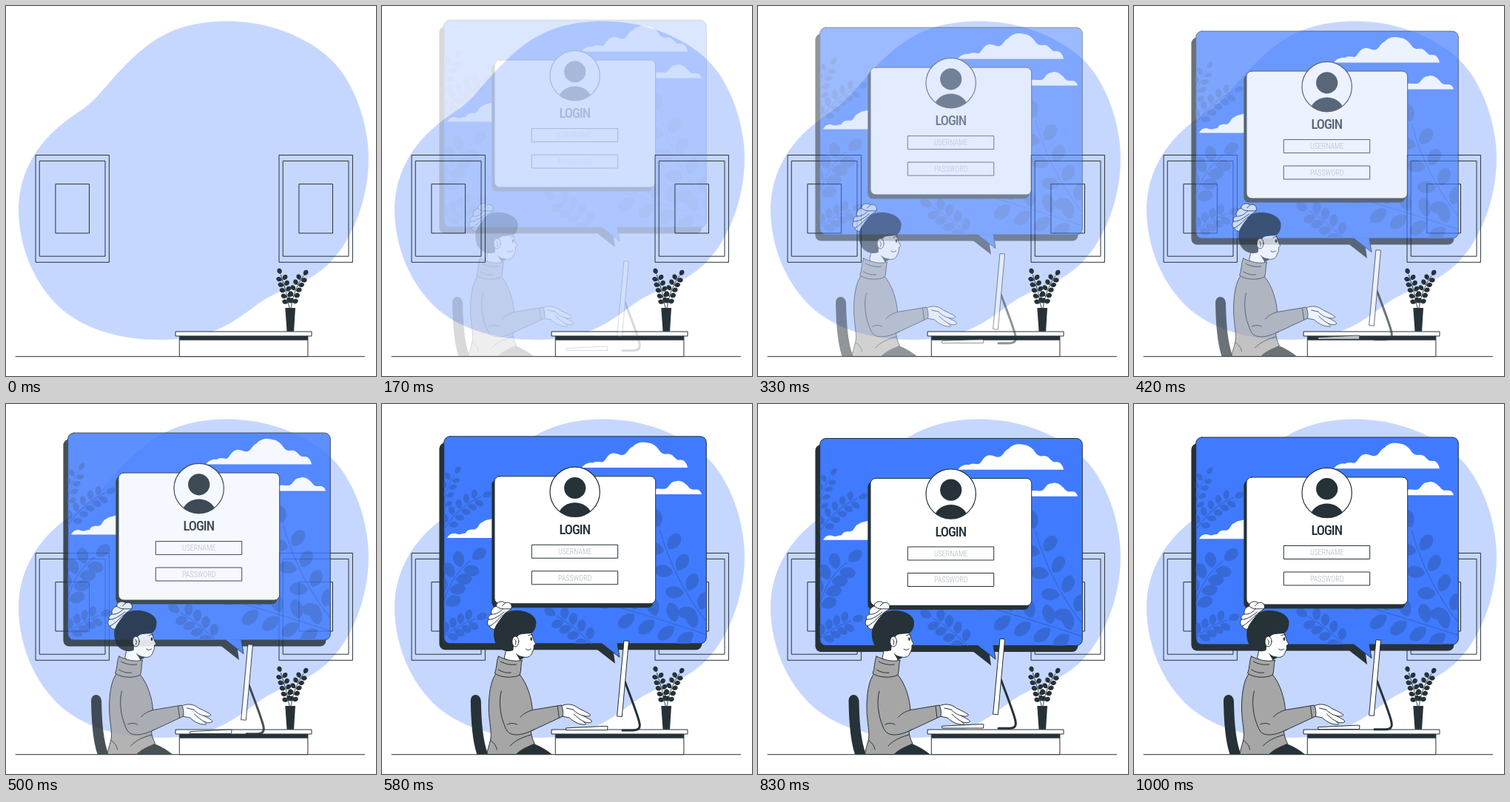
These frames come from a looping animation (500 px wide and 500 px high, 1.04 s). An HTML page:

```html
<!DOCTYPE html>
<html lang="en">
<head>
<meta charset="utf-8">
<title>Login</title>
<style>
html, body { margin: 0; width: 100%; height: 100%; overflow: hidden; background: #fff; }
svg { display: block; width: 100%; height: 100%; }
.line { fill: none; stroke: #263238; stroke-width: 1; stroke-linecap: round; stroke-linejoin: round; }
.white { fill: #fff; }
.dark { fill: #263238; }
text { font-family: 'Oswald', 'Roboto Condensed', 'Open Sans Condensed', 'Open Sans', Roboto, sans-serif; font-stretch: 75%; text-anchor: middle; }
.title { font-size: 18.5px; font-weight: 500; letter-spacing: -1px; }
.hint { font-size: 10px; font-weight: 300; fill: #aeb3b7; }
</style>
</head>
<body>
<svg viewBox="0 0 500 500">
  <defs>
    <clipPath id="pane"><rect x="83.7" y="46.5" width="354.6" height="280" rx="8"/></clipPath>
    <g id="picture" class="line">
      <rect x="40.4" y="201.5" width="99" height="144.8"/>
      <rect x="45.6" y="209.4" width="88.4" height="128.8"/>
      <rect x="67.3" y="240.6" width="45.2" height="66.4"/>
    </g>
  </defs>

  <path fill="#c6d7ff" d="M300 20.5C352 20.5 406 40 441 74C472 106 490 160 490 206C490 262 467 322 430 354C398 380 376 378 340 403C307 427 280 451 206 451C160 451 112 440 76 410.5C38 377 17 325 17 275C17 233 36 195 66 168C96 141 105 143 127 118C151 91 171 66 203 45C233 26.5 266 20.5 300 20.5Z"/>
  <use href="#picture"/>
  <use href="#picture" x="329"/>

  <g id="panel">
    <path class="dark" d="M290 334L315 353.5L312 333Z"/>
    <rect class="dark" x="77.4" y="55" width="355" height="280" rx="8"/>
    <rect class="line" style="fill:#407bff" x="83.7" y="46.5" width="354.6" height="280" rx="8"/>
    <path fill="#407bff" d="M296 325.6L321 345L318 325.6Z"/>
    <path class="line" d="M297 326.5L321 345L318 326.5"/>
    <g clip-path="url(#pane)">
      <g id="foliage" fill="#3769d6" stroke="#3769d6"></g>
    </g>
    <g class="white" transform="translate(0 -.7)">
      <path d="M270 89.5C274 84 280 82 285 83C290 80 294 82 298 82C303 80 304 71 312 70C318 69 322 74 327 72C332 70 332 64 339 61C344 55 352 54 360 56C368 57 372 62 376 68C382 74 386 69 391 72C396 75 397 80 403 79C409 79 412 84 413 89.5Z"/>
      <path d="M368 125.5V119C374 116 380 120 385 117C389 114 390 108 397 108C403 105 409 110 413 114C417 120 420 119 425 119C429 119 431 122 432 125.5Z"/>
      <path d="M88 184.5C91 179 96 177 101 179C105 181 109 178 113 178C116 172 121 173 125 173C130 172 131 164 136 163C141 159 147 160 153 157V184.5Z"/>
    </g>
    <rect class="dark" x="148.3" y="105" width="218" height="173" rx="7"/>
    <rect class="line" style="fill:#fff" x="152" y="100.5" width="217.7" height="172" rx="7"/>
    <circle class="line" style="fill:#fff;stroke-width:1.2" cx="260.7" cy="121.5" r="33.7"/>
    <circle class="dark" cx="260.7" cy="116.2" r="14.6"/>
    <path class="dark" d="M239.8 148C243 141 251 136 260.7 136S278.5 141 281.7 148A33.7 33.7 0 0 1 239.8 148Z"/>
    <text class="title dark" x="260.3" y="178.9">LOGIN</text>
    <rect class="line" x="202.7" y="193" width="116" height="18"/>
    <rect class="line" x="202.7" y="228.5" width="116" height="18"/>
    <text class="hint" x="260.7" y="205.8">USERNAME</text>
    <text class="hint" x="260.7" y="241.4">PASSWORD</text>
  </g>

  <path class="line" d="M13 473.7H484.5"/>
  <rect class="line" style="fill:#fff" x="234.7" y="446" width="173.2" height="27.7"/>
  <rect class="dark" x="234.7" y="446" width="173.2" height="5.7"/>
  <rect class="line" style="fill:#fff" x="229.5" y="440" width="183.5" height="6"/>
  <path class="dark" d="M377.3 408H391L389 439.7H379.5Z"/>
  <g id="plant" fill="#263238" stroke="#263238"></g>

  <g id="monitor">
    <path class="line" style="stroke-width:3" d="M328.5 373C337 396 345 416 347.6 427C350 436 346 438 340 438.2H325"/>
    <path class="line" style="fill:#fff" d="M327.3 317.2L333.5 317.7L324.3 419.8L318 419.3Z"/>
    <path class="line" style="fill:#fff" d="M249 435.2L302 432.6L305 433L304.5 438H249Z"/>
  </g>

  <g id="person">
    <path class="dark" d="M122.5 402C122 390 136 390 136.5 402C137 430 139 455 146 473.5H131C125 455 123 430 122.5 402Z"/>
    <path class="dark" d="M180 473.5C190 464 200 462 208 459C218 463 226 468 232.5 473.5Z"/>
    <path class="line" style="fill:#fff" d="M204 309C206 313 207 317 208 320C210 323 211 325 208 326C208 329 208 332 206 335C204 342 199 343 194 342L189 341V351C181 351 172 348 168 343L172 325L182 312Z"/>
    <path class="dark" d="M183 336C187 340 191 342 196 342.3L189 346Z"/>
    <path class="dark" d="M155 300C160 286 170 280 182 279C198 278 211 286 211 295C211 303 208 308 204 310C196 311 190 310 187 313C183 317 181 322 180 333C172 336 162 333 157 325C153 317 153 308 155 300Z"/>
    <ellipse class="line" style="fill:#fff" cx="183" cy="321" rx="4.5" ry="7"/>
    <path class="line" d="M182 318Q185 320 183 325M197 331Q200 334 204 331M200.5 313Q203 310.5 206 312"/>
    <ellipse class="dark" cx="204.4" cy="317.6" rx="1.3" ry="2.3"/>
    <path class="line" style="fill:#fff" d="M157 273C157 267 166 265 169 269C175 266 180 272 177 277C174 280 170 281 168 284C164 290 158 296 155 304C152 305 149 303 148 300C145 299 144 294 147 291C145 288 148 285 151 284C149 280 152 275 157 273Z"/>
    <path class="line" d="M157 273C163 279 170 276 177 277M151 284C157 285 162 281 166 277M147 291C153 292 160 287 168 281M148 300C153 298 160 291 166 285M169 269L165 273"/>
    <path class="line" style="fill:#fff" d="M245 408C253 404 262 406 268 411C274 414 281 417 284.5 420C283 423 278 422 274 421C279 424 285 426 286.5 429C284 431.5 279 431 275 429C276 431 279 432 278 433C271 434 262 430 256 424L246 422Z"/>
    <path class="line" d="M261 413C266 418 270 420 274 421M262 419C267 424 271 427 275 429M252 411L261 413"/>
    <path class="line" style="fill:#a6a6a6" d="M158 363C149 372 147 395 147 410C147 430 152 445 149 455C147 463 145 468 144.5 473.5H184C191 466 201 463 209 459C206 453 204 447 204 442L247 422C248 416 247 411 245 407L206 413.5C205 398 199 378 189 366Z"/>
    <path class="line" d="M164 388C160 400 163 420 166 428C170 440 172 447 184 447C192 447 200 444 208 440M206 413.5C198 416 193 419 190 423M172 433C176 431 181 431 185 433M150 455C155 459 157 462 158 467M176 462C181 456 190 451 204 447M240 408.5L242 424"/>
    <path class="line" style="fill:#a6a6a6" d="M160 341C157 348 158 357 155 364C163 370 180 371 189 366C191 360 190 352 192 346C182 349 170 346 160 341Z"/>
    <path class="line" d="M163 348C170 352 178 353 184 352M160 359C165 362 171 364 177 363"/>
  </g>
</svg>
<script>
const $ = id => document.getElementById(id);
const NS = 'http://www.w3.org/2000/svg';

function add(parent, attrs) {
  const el = document.createElementNS(NS, 'path');
  for (const k in attrs) el.setAttribute(k, attrs[k]);
  parent.appendChild(el);
}

function leaf(parent, x, y, deg, len, w) {
  add(parent, {
    d: `M0 0C${len * .2} ${-w} ${len * .9} ${-w} ${len} 0C${len * .9} ${w} ${len * .2} ${w} 0 0Z`,
    transform: `translate(${x} ${y}) rotate(${deg})`, stroke: 'none'
  });
}

// Quadratic stem with pairs of leaves and one at the tip
function branch(parent, [x0, y0, cx, cy, x1, y1], pairs, len, w, gap) {
  add(parent, { d: `M${x0} ${y0}Q${cx} ${cy} ${x1} ${y1}`, fill: 'none', 'stroke-width': len > 12 ? 1.4 : 0.9 });
  for (let i = 0; i <= pairs; i++) {
    const t = (i + .8) / (pairs + .8), u = 1 - t;
    const x = u * u * x0 + 2 * u * t * cx + t * t * x1;
    const y = u * u * y0 + 2 * u * t * cy + t * t * y1;
    const a = Math.atan2(u * (cy - y0) + t * (y1 - cy), u * (cx - x0) + t * (x1 - cx));
    const sides = i === pairs ? [0] : [-56, 56];
    for (const s of sides) {
      const b = a + s * Math.PI / 180;
      leaf(parent, x + Math.cos(b) * gap, y + Math.sin(b) * gap, b * 180 / Math.PI, len, w);
    }
  }
}

const foliage = $('foliage'), plant = $('plant');
branch(foliage, [82, 152, 84, 118, 98, 98], 4, 11, 4.6, 2);
branch(foliage, [82, 174, 104, 140, 134, 128], 5, 13, 5.5, 2);
branch(foliage, [80, 290, 86, 240, 120, 214], 4, 22, 10, 3);
branch(foliage, [80, 320, 100, 302, 126, 293], 4, 15, 6.5, 2);
branch(foliage, [288, 332, 262, 304, 236, 289], 4, 17, 7.5, 2);
branch(foliage, [444, 304, 396, 246, 375, 172], 4, 25, 11, 4);
branch(foliage, [444, 316, 384, 296, 316, 276], 4, 27, 11, 4);

branch(plant, [383, 408, 379, 385, 371.3, 363], 5, 8, 4.2, 1);
branch(plant, [385, 408, 389, 382, 402, 364.5], 5, 8, 4.2, 1);

const LOOP = 1040, TRAVEL = 30, FLOAT = 2.8;
const SPAN = 12, ENTER = 1.85, HOVER = ENTER + SPAN;
const startOf = n => Math.round(n * 25 / 6) * 10;

function draw(ms) {
  const t = ms % LOOP;
  let n = Math.floor(t * 24 / 1000) + 1;
  while (startOf(n) > t) n--;
  n = Math.min(n, 24);

  const p = n < 2 ? 0 : Math.min(1, (n - ENTER) / SPAN);
  const sway = n > HOVER ? Math.sin(Math.PI * (n - HOVER) / SPAN) : 0;
  const d = TRAVEL * (p - 1) + FLOAT * (sway - 1);
  const place = (id, x, y) => {
    $(id).setAttribute('transform', `translate(${x} ${y})`);
    $(id).setAttribute('opacity', p);
  };
  place('panel', 0, d);
  place('monitor', 0, -d);
  place('person', d, 0);
}

const begin = performance.now();
function tick() {
  draw(performance.now() - begin);
  requestAnimationFrame(tick);
}
draw(0);
requestAnimationFrame(tick);
</script>
</body>
</html>
```
